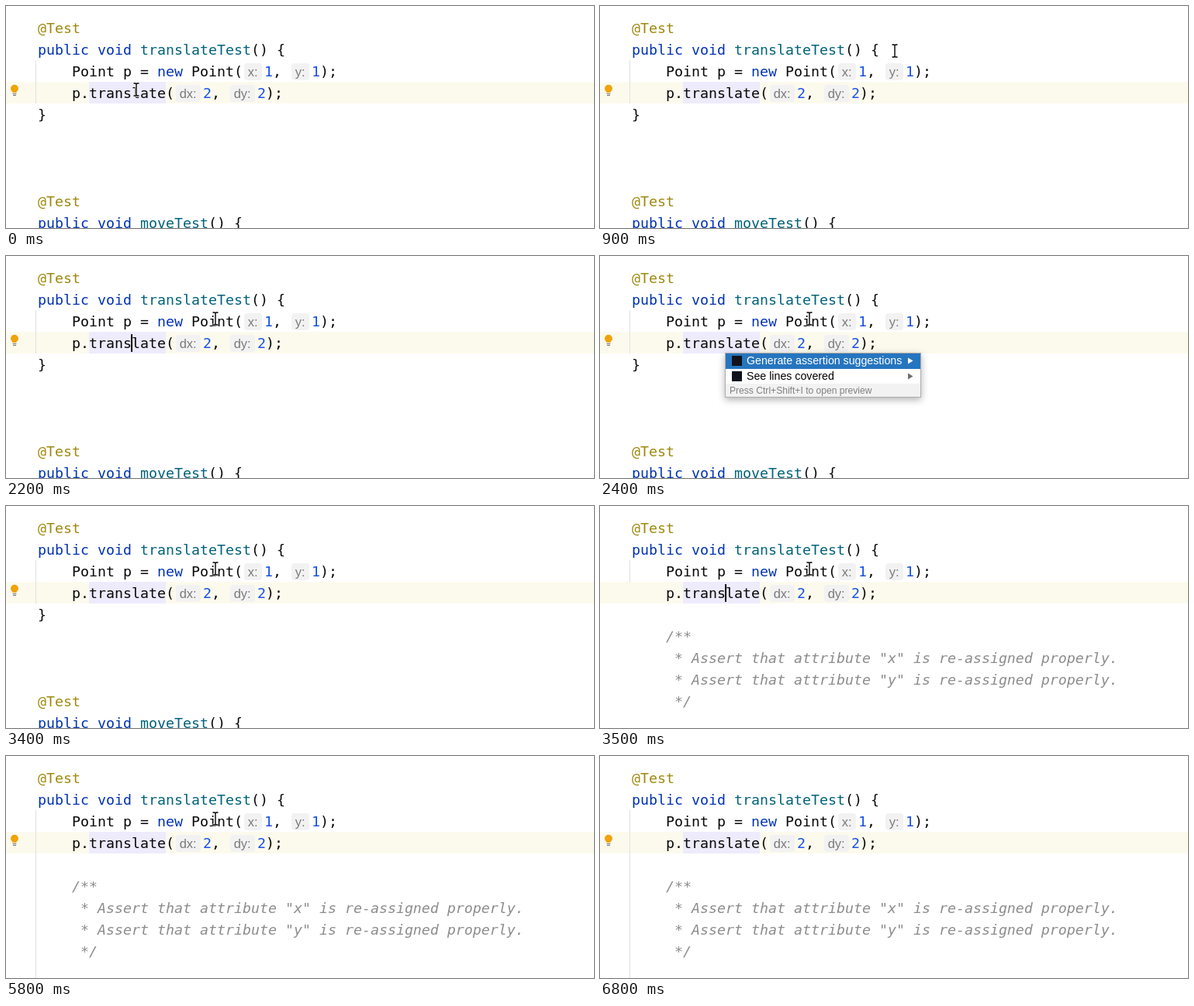
An HTML page for the animation above (7100 ms loop, 758 by 287 pixels).

```html
<!DOCTYPE html>
<html lang="en">
<head>
<meta charset="utf-8">
<title>Editor demo</title>
<style>
  html, body { margin: 0; width: 100%; height: 100%; overflow: hidden; background: #fff; }
  svg { display: block; width: 758px; height: 287px; }
  text { white-space: pre; }
  .code { font: 18.27px "DejaVu Sans Mono", "Noto Sans Mono", monospace; fill: #080808; }
  .note { fill: #9e880d; }
  .key { fill: #0033b3; }
  .fn { fill: #00627a; }
  .num { fill: #1750eb; }
  .doc { fill: #8c8c8c; font-style: italic; }
  .hint { font: 16.5px "Liberation Sans", Arial, sans-serif; fill: #7a7a7a; }
  .item { font: 14.2px "Liberation Sans", Arial, sans-serif; }
  .foot { font: 12.1px "Liberation Sans", Arial, sans-serif; fill: #808080; }
  #popup { filter: drop-shadow(0 3px 5px rgba(0, 0, 0, .3)); }
</style>
</head>
<body>
<svg viewBox="0 0 758 287" xmlns="http://www.w3.org/2000/svg">
  <rect width="758" height="287" fill="#fff"/>
  <rect y="98" width="758" height="28" fill="#fcfaed"/>
  <rect x="107" y="98" width="99" height="28" fill="#edebfc"/>
  <rect id="guide" x="38" y="70" width="1" fill="#dce1e3"/>
  <g id="common"></g>
  <g id="before"></g>
  <g id="after"></g>
  <g id="bulb">
    <path d="M8.6 112C8.6 110.4 6 109.6 6 106.8A5 5 0 0 1 16 106.8C16 109.6 13.4 110.4 13.4 112Z" fill="#f0a30a"/>
    <path d="M8.6 113.5H13.4M9 115.5H13" stroke="#6e6e6e"/>
  </g>
  <rect id="caret" x="161" y="101" width="2" height="23" fill="#000"/>
  <g id="popup">
    <rect x="161.5" y="125.5" width="252" height="57" fill="#fff" stroke="#adadad"/>
    <rect x="162" y="126" width="251" height="20" fill="#2675bf"/>
    <rect x="162" y="165" width="251" height="17" fill="#f2f2f2"/>
    <rect x="170" y="129" width="13" height="13" fill="#11131c"/>
    <rect x="170" y="149" width="13" height="13" fill="#11131c"/>
    <text class="item" x="189" y="140" fill="#fff">Generate assertion suggestions</text>
    <text class="item" x="189" y="160">See lines covered</text>
    <text class="foot" x="167" y="178">Press Ctrl+Shift+I to open preview</text>
    <path d="M397 131.5L403.5 135.5L397 139.5Z" fill="#fff"/>
    <path d="M397 151.5L403.5 155.5L397 159.5Z" fill="#6e6e6e"/>
  </g>
  <g id="mouse" fill="none">
    <path d="M-3.5 -8H-1L0 -7L1 -8H3.5M0 -7V7M-3.5 8H-1L0 7L1 8H3.5" stroke="#fff" stroke-width="3"/>
    <path d="M-3.5 -8H-1L0 -7L1 -8H3.5M0 -7V7M-3.5 8H-1L0 7L1 8H3.5" stroke="#000" stroke-width="1.4"/>
  </g>
</svg>
<script>
const LOOP = 7100, STEP = 100;
const $ = id => document.getElementById(id);
const baseline = row => 35 + row * 28;

function add(parent, tag, attrs, text = "") {
  const el = document.createElementNS("http://www.w3.org/2000/svg", tag);
  for (const name in attrs) el.setAttribute(name, attrs[name]);
  el.textContent = text;
  $(parent).append(el);
}

// Parts alternate: x, style, text.
function line(parent, row, ...parts) {
  for (let i = 0; i < parts.length; i += 3)
    add(parent, "text", { x: parts[i], y: baseline(row), class: "code " + parts[i + 1] }, parts[i + 2]);
}

function hint(row, x, width, label) {
  const y = baseline(row);
  add("common", "rect", { x, y: y - 17, width, height: 22, rx: 4, fill: "#f2f2f2" });
  add("common", "text", { x: x + 4.7, y: y - 0.5, class: "hint" }, label);
}

function method(parent, row, name) {
  const end = 173 + name.length * 11;
  line(parent, row, 41, "key", "public", 118, "key", "void", 173, "fn", name, end, "", "() {");
}

line("common", 0, 41, "note", "@Test");
method("common", 1, "translateTest");
line("common", 2, 85, "", "Point p =", 195, "key", "new", 239, "", "Point(",
  333, "num", "1", 344, "", ",", 394, "num", "1", 405, "", ");");
line("common", 3, 85, "", "p.translate(", 254, "num", "2", 265, "", ",",
  324, "num", "2", 335, "", ");");
hint(2, 307, 23, "x:");
hint(2, 368, 23, "y:");
hint(3, 219, 32, "dx:");
hint(3, 289, 32, "dy:");

line("before", 4, 41, "", "}");
line("before", 8, 41, "note", "@Test");
method("before", 9, "moveTest");

line("after", 5, 85, "doc", "/**");
["x", "y"].forEach((name, i) =>
  line("after", 6 + i, 85, "doc", ` * Assert that attribute "${name}" is re-assigned properly.`));
line("after", 8, 85, "doc", " */");

// Pointer keys: time, x, y.
const path = [
  [0, 168, 108], [400, 168, 108], [600, 270, 74], [800, 409, 41], [900, 380, 58],
  [1100, 190, 112], [1200, 162, 120], [1400, 270, 81], [6000, 270, 81],
  [6200, 235, 64], [6500, 110, 26], [6700, 55, 2], [6800, 50, -20], [LOOP, 50, -20]
];

function pointer(t) {
  const i = path.findIndex(key => key[0] > t);
  const [a, b] = [path[i - 1], path[i]];
  const k = (t - a[0]) / (b[0] - a[0]);
  return [a[1] + (b[1] - a[1]) * k, a[2] + (b[2] - a[2]) * k];
}

const within = (t, spans) => spans.some(([from, to]) => t >= from && t < to);
const show = (id, on) => $(id).setAttribute("visibility", on ? "visible" : "hidden");

const caretOn = [[1200, 1700], [2200, 2300], [3500, 4700], [5100, 5800], [6300, 6800]];
const bulbOff = [[1200, 2100], [3500, 4500]];

function draw(time) {
  const t = Math.floor((time % LOOP) / STEP) * STEP;
  const done = t >= 3500;
  show("before", !done);
  show("after", done);
  show("caret", within(t, caretOn));
  show("bulb", !within(t, bulbOff));
  show("popup", within(t, [[2300, 3400]]));
  $("popup").setAttribute("opacity", t < 2400 ? 0.5 : 1);
  $("guide").setAttribute("height", !done ? 56 : t < 3800 ? 28 : 217);
  show("mouse", t < 6800);
  $("mouse").setAttribute("transform", `translate(${pointer(t)})`);
}

const start = performance.now();
function tick() {
  draw(performance.now() - start);
  requestAnimationFrame(tick);
}
tick();
</script>
</body>
</html>
```
